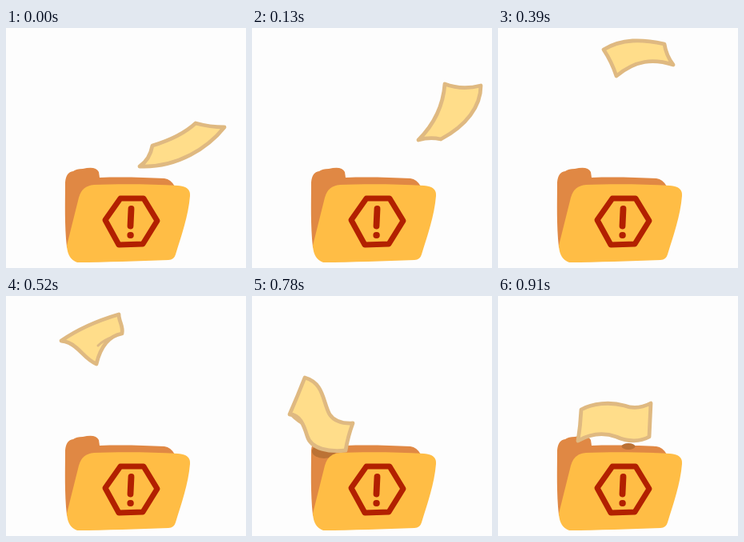
These frames come from a looping animation (300x300 px, 1.04 s). An HTML page:

```html
<!DOCTYPE html>
<html lang="en">
<head>
<meta charset="utf-8">
<title>Paper flying into a folder</title>
<style>
  html, body { margin: 0; width: 100%; height: 100%; overflow: hidden; background: #fdfdfd; }
  svg { display: block; width: 100%; height: 100%; }
  .pose {
    visibility: hidden;
    animation: show 1040ms step-end infinite;
    animation-delay: calc(var(--i) * 130ms - 1040ms);
  }
  @keyframes show {
    0% { visibility: visible; }
    12.5%, 100% { visibility: hidden; }
  }
  .pose path { fill: #ffdd8a; stroke: #dfb981; stroke-width: 4.8; stroke-linejoin: round; stroke-linecap: round; }
  .pose .under { fill: #dfb981; stroke: none; }
  .pose .fold { fill: none; stroke-width: 3; }
  .shadow { fill: #bb7235; }
  .back { fill: #e08844; }
  .front { fill: #ffbd45; }
  .sign { fill: none; stroke: #b22000; stroke-width: 7; stroke-linejoin: round; stroke-linecap: round; }
  .mark { stroke-width: 7.8; }
</style>
</head>
<body>
<svg viewBox="0 0 300 300">
  <path class="back" d="M76 274C73 245 74 220 74 193Q75 180 84 179Q88 176 96 176Q112 172 116 180L117 187C145 186 175 187 198 188Q206 189 211 198L200 212L92 240L78 276Z"/>

  <g class="pose" style="--i:0">
    <path d="M237 119Q255 124 273 124C253 149 215 175 167 173C176 167 181 158 183 147C203 141 224 131 237 119Z"/>
  </g>
  <g class="pose" style="--i:1">
    <path d="M241 70Q262 78 286 72C286 98 268 122 236 139Q222 136 208 140C228 120 239 97 241 70Z"/>
  </g>
  <g class="pose" style="--i:2">
    <path d="M200 13C206 23 220 26 230 30Q236 35 246 36Q258 39 265 49Q276 59 283 70L252 72Q244 58 234 53C214 48 204 34 200 13Z"/>
    <path class="fold" d="M220 29Q226 34 235 37"/>
  </g>
  <g class="pose" style="--i:3">
    <path d="M132 27C155 13 180 14 208 20Q210 34 219 46C194 38 172 40 148 60Q142 42 132 27Z"/>
  </g>
  <g class="pose" style="--i:4">
    <path d="M69 56C92 40 117 30 141 23C141 32 147 38 145 47C128 50 118 64 113 85C101 80 95 70 87 64Q79 57 69 56Z"/>
    <path class="under" d="M69 56Q82 55 92 66L87 66Q79 60 69 56Z"/>
    <path class="fold" d="M134 51Q122 55 115 62"/>
  </g>
  <g class="pose" style="--i:5">
    <path d="M73 59Q86 57 98 60Q97 72 93 83Q95 98 89 115Q66 105 52 117Q46 127 40 128Q40 102 50 84Z"/>
    <path class="under" d="M51 118Q57 107 70 106Q82 106 89 115Q66 107 51 118Z"/>
  </g>
  <g class="pose" style="--i:6">
    <ellipse class="shadow" cx="90" cy="194" rx="15" ry="9"/>
    <path d="M66 102C90 109 88 131 97 148Q105 160 126 159Q120 175 117 193C97 195 74 192 69 175C65 162 60 148 47 148Q57 125 66 102Z"/>
    <path class="under" d="M47 149Q61 146 66 163Q57 159 47 149Z"/>
  </g>
  <g class="pose" style="--i:7">
    <ellipse class="shadow" cx="163" cy="188" rx="8.5" ry="4"/>
    <path d="M104 142C118 134 140 132 158 137Q174 143 191 134Q190 155 189 176C178 182 163 183 148 176C131 170 114 173 100 181Q103 162 104 142Z"/>
  </g>

  <path class="front" d="M76 272Q83 244 91 212Q95 197 110 196C140 195 180 195 215 197Q231 198 230 210C228 235 219 260 212 283Q210 290 203 290C165 291 125 293 89 293Q77 289 76 272Z"/>
  <g class="sign">
    <path d="M124 240L143 213L172 213L189 241L171 270L141 271Z"/>
    <path class="mark" d="M156.500 226L155.500 247.500M155.300 259h.6"/>
  </g>
</svg>
</body>
</html>
```
